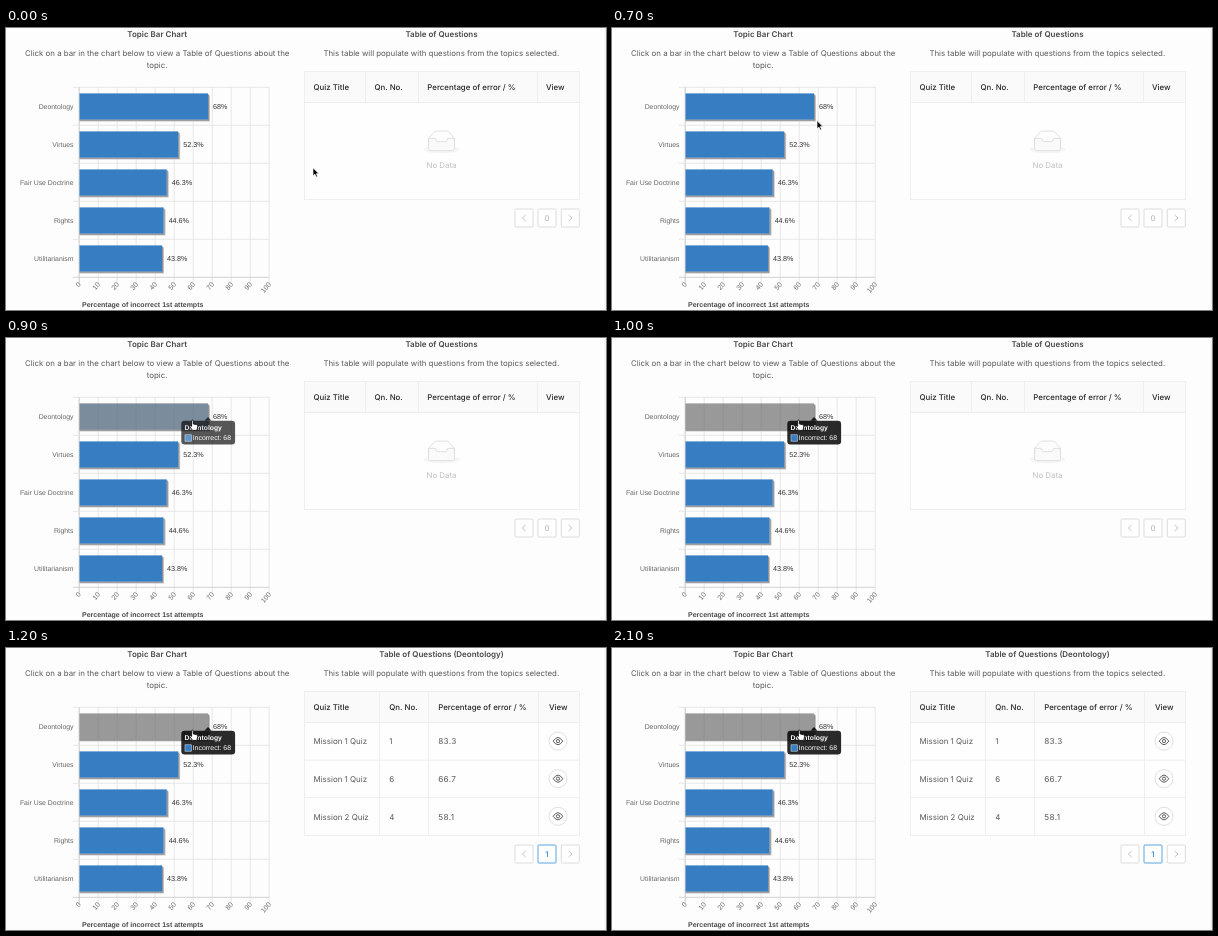
Animation of 600x282 px, one loop 2.3 s. Source, as an HTML page:

```html
<!DOCTYPE html>
<html lang="en">
<head>
<meta charset="utf-8">
<title>Topic chart</title>
<style>
  html, body { margin: 0; width: 100%; height: 100%; overflow: hidden; background: #fdfdfd; }
  svg { display: block; width: 600px; height: 282px; }
  text { white-space: pre; text-rendering: geometricPrecision; }
  .ui { font: 7.87px Inter, "Open Sans", sans-serif; fill: #595959; }
  .title { font-size: 7.98px; font-weight: 600; fill: #484848; }
  .head { font-weight: 500; fill: #262626; }
  .cell { font-size: 7.95px; }
  .num { font-size: 8.2px; letter-spacing: .35px; }
  .chart { font: 6.9px "Liberation Sans", Arial, sans-serif; fill: #666; }
  .value { font-size: 7.2px; fill: #333; }
  .bold { font-weight: 700; }
  .mid { text-anchor: middle; }
  .end { text-anchor: end; }
</style>
</head>
<body>
<svg id="stage" viewBox="0 0 600 282"></svg>
<script>
const LOOP = 2300, STEP = 100;
const HOVER = 780, FADE = 220, LOADED = 1200;
const BLUE = [55, 125, 194], GRAY = [88, 88, 88];
const AXIS_X = 73, UNIT = 1.9, TOP = 59, ROW = 38;
const topics = [
  ['Deontology', 68], ['Virtues', 52.3], ['Fair Use Doctrine', 46.3],
  ['Rights', 44.6], ['Utilitarianism', 43.8]
];
const questions = [
  ['Mission 1 Quiz', 1, '83.3'], ['Mission 1 Quiz', 6, '66.7'], ['Mission 2 Quiz', 4, '58.1']
];
const TABLE = { left: 298.5, right: 573.5, top: 43.5, body: 74.5 };

const text = (x, y, cls, content, extra = '') =>
  `<text x="${x}" y="${y}" class="${cls}" ${extra}>${content}</text>`;
const line = (x1, y1, x2, y2, color, width = 1) =>
  `<path d="M${x1} ${y1}L${x2} ${y2}" stroke="${color}" stroke-width="${width}"/>`;
const rect = (x, y, w, h, fill, extra = '') =>
  `<rect x="${x}" y="${y}" width="${w}" height="${h}" fill="${fill}" ${extra}/>`;
const rgb = c => `rgb(${c.map(Math.round)})`;

// Soft edge along the right and bottom of a bar.
const barShadow = (x, y, right, bottom, depth, color) =>
  `<path d="M${right} ${y + depth}h${depth}V${bottom + depth}H${x}v${-depth}H${right}z" fill="${color}"/>`;

function chart() {
  let out = '';
  for (let i = 0; i <= 10; i++) {
    const x = AXIS_X + i * 19;
    out += line(x + .2, TOP, x + .2, 255, i ? '#e3e3e3' : '#bdbdbd', .8);
    out += text(0, 2.4, 'chart end', i * 10, `transform="translate(${x + .5} 255) rotate(-50)"`);
  }
  for (let i = 0; i <= 5; i++) {
    const y = TOP + i * ROW + .3;
    out += line(67, y, 263, y, i < 5 ? '#e3e3e3' : '#c8c8c8', .8);
  }
  topics.forEach(([name, value], i) => {
    const x = AXIS_X + .5, y = TOP + 6.4 + i * ROW;
    const right = AXIS_X + value * UNIT - .2, bottom = y + 26.2;
    out += barShadow(x, y, right, bottom, 2, '#c8c8c8') + barShadow(x, y, right, bottom, 1.1, '#929292');
    out += rect(x, y, right - x, bottom - y, rgb(BLUE), i ? '' : 'id="bar"');
    out += text(67.5, y + 15.5, 'chart end', name);
    out += text(right + 5.1, y + 15.6, 'chart value', value + '%');
  });
  return out + text(136.7, 278.6, 'chart bold mid', 'Percentage of incorrect 1st attempts',
    'style="font-size:7px;fill:#4a4a4a"');
}

function tableFrame(bottom, columns, starts, lineEnd) {
  const { left, right, top, body } = TABLE;
  const names = ['Quiz Title', 'Qn. No.', 'Percentage of error / %', 'View'];
  return rect(left, top, right - left, bottom - top, '#fefefe') +
    rect(left, top, right - left, body - top, '#fafafa') +
    rect(left, top, right - left, bottom - top, 'none', 'stroke="#efefef"') +
    line(left, body, right, body, '#ededed') +
    columns.map(x => line(x, top, x, lineEnd, '#efefef')).join('') +
    names.map((n, i) => text(starts[i], 61.6, 'ui head', n)).join('');
}

function pager(y, page, border, color) {
  const chevron = (x, d) =>
    `<path d="M${x - d} ${y + 6}l${2 * d} 3l${-2 * d} 3" fill="none" stroke="#bdbdbd" stroke-width=".9"/>`;
  const box = (x, c) => rect(x, y, 18, 18, '#fff', `rx="1" stroke="${c}"`);
  return box(509, '#dcdcdc') + box(555.3, '#dcdcdc') + box(532, border) +
    chevron(518, -1.7) + chevron(564.3, 1.7) +
    text(541, y + 11.9, 'ui mid', page, `style="fill:${color};font-weight:500"`);
}

function emptyTable() {
  const tray = `<g transform="translate(417.6 103.1) scale(.56)">
    <ellipse cx="32" cy="33" rx="32" ry="7" fill="#f5f5f5"/>
    <g stroke="#d6d6d6" stroke-width="1.3">
      <path d="M55 12.8L44.9 1.3Q44 0 42.9 0H21.1Q20 0 19.1 1.3L9 12.8V22H55z" fill="#fdfdfd"/>
      <path d="M41.6 16q0-3 2.2-3H55V31q0 4-3 4H12q-3 0-3-4V13H20.2q2.2 0 2.2 3t2.2 2.9H39.4q2.2 0 2.2-2.9z" fill="#fafafa"/>
    </g></g>`;
  return text(435.5, 9.4, 'ui title mid', 'Table of Questions') +
    tableFrame(171.5, [359.5, 412.5, 531.5], [307.5, 368.5, 421.3, 540], TABLE.body) +
    tray + text(435.5, 139.6, 'ui mid', 'No Data', 'style="fill:#bfbfbf"') +
    pager(181, 0, '#dcdcdc', '#bdbdbd');
}

function filledTable() {
  const starts = [307.5, 383.3, 432.2, 543];
  let out = text(435.5, 9.4, 'ui title mid', 'Table of Questions (Deontology)') +
    tableFrame(187.5, [373.5, 422.5, 532.5], starts, 187.5);
  questions.forEach(([quiz, number, error], i) => {
    const y = 93.4 + i * 37.6;
    if (i) out += line(TABLE.left, y - 18.9, TABLE.right, y - 18.9, '#efefef');
    out += text(starts[0], y + 3, 'ui cell', quiz) + text(starts[1], y + 3, 'ui cell', number) +
      text(starts[2], y + 3, 'ui num', error) +
      `<g transform="translate(552 ${y - .3})" fill="none">
        <circle r="9" fill="#fff" stroke="#dcdcdc" stroke-width=".9"/>
        <g stroke="#4a4a4a" stroke-width=".9"><path d="M-4.8 0Q0-7.2 4.8 0Q0 7.2-4.8 0z"/><circle r="1.6"/></g>
      </g>`;
  });
  return out + pager(197, 1, '#5aa5e0', '#2f88d0');
}

const tooltip = rect(175.3, 82.7, 53.8, 23.8, '#000', 'rx="3.2" fill-opacity=".83"') +
  '<path d="M198.4 82.7l3.6-3.8l3.6 3.8z" fill-opacity=".83"/>' +
  text(178.5, 91.8, 'chart bold', 'Deontology', 'style="fill:#fff;font-size:6.8px"') +
  rect(179, 96.8, 6.4, 6.4, rgb(BLUE), 'stroke="#c3d5e8" stroke-width=".6"') +
  text(186.7, 102.4, 'chart', 'Incorrect: 68', 'style="fill:#fff"');

const stage = document.getElementById('stage');
stage.innerHTML = rect(0, 0, 600, 282, '#fdfdfd') + line(599.3, 0, 599.3, 282, '#ececec') +
  text(151.2, 9.4, 'ui title mid', 'Topic Bar Chart') +
  text(151.2, 28, 'ui mid', 'Click on a bar in the chart below to view a Table of Questions about the') +
  text(151.2, 40.4, 'ui mid', 'topic.') +
  text(435.3, 28, 'ui mid', 'This table will populate with questions from the topics selected.') +
  chart() +
  `<g id="empty">${emptyTable()}</g><g id="filled">${filledTable()}</g><g id="tip">${tooltip}</g>
  <path id="arrow" d="M0 0V8.2L1.9 6.5L3.2 9.4L4.6 8.8L3.3 6H5.9z" fill="#000" stroke="#fff" stroke-width=".7"/>
  <path id="hand" d="M2.4.9c0-1.1 1.7-1.1 1.7 0v3l3 .7c1.2.3 1.5.9 1.4 1.9l-.7 3.9H3.4L.7 6.8c-.6-1 .5-1.6 1.7-.4z"
    fill="#fff" stroke="#111" stroke-width=".9"/>`;

const el = id => document.getElementById(id);
const show = (id, on) => el(id).setAttribute('display', on ? 'inline' : 'none');
const move = (id, x, y) => el(id).setAttribute('transform', `translate(${x} ${y})`);
const clamp = v => Math.max(0, Math.min(1, v));
const easeOut = (u, power) => 1 - (1 - u) ** power;

function draw(time) {
  const t = Math.floor(time % LOOP / STEP) * STEP;

  const glide = clamp((t - 100) / 700);
  const eased = glide + .12 * glide * (1 - glide);
  move('arrow', 307 - 117 * eased, 139.7 - 54 * eased);
  show('arrow', t < 800);
  show('hand', t >= 800);
  move('hand', t < 900 ? 186.4 : t < 1300 ? 183.2 : 184, t < 900 ? 83.4 : 82);

  const hover = clamp((t - HOVER) / FADE);
  const tint = easeOut(hover, 1.4);
  el('bar').setAttribute('fill', rgb(BLUE.map((c, i) => c + (GRAY[i] - c) * tint)));
  el('bar').setAttribute('fill-opacity', 1 - .4 * tint);
  el('tip').setAttribute('opacity', easeOut(hover, 2));

  show('empty', t < LOADED);
  show('filled', t >= LOADED);
}

const start = performance.now();
function tick() {
  draw(performance.now() - start);
  requestAnimationFrame(tick);
}
draw(0);
requestAnimationFrame(tick);
</script>
</body>
</html>
```
